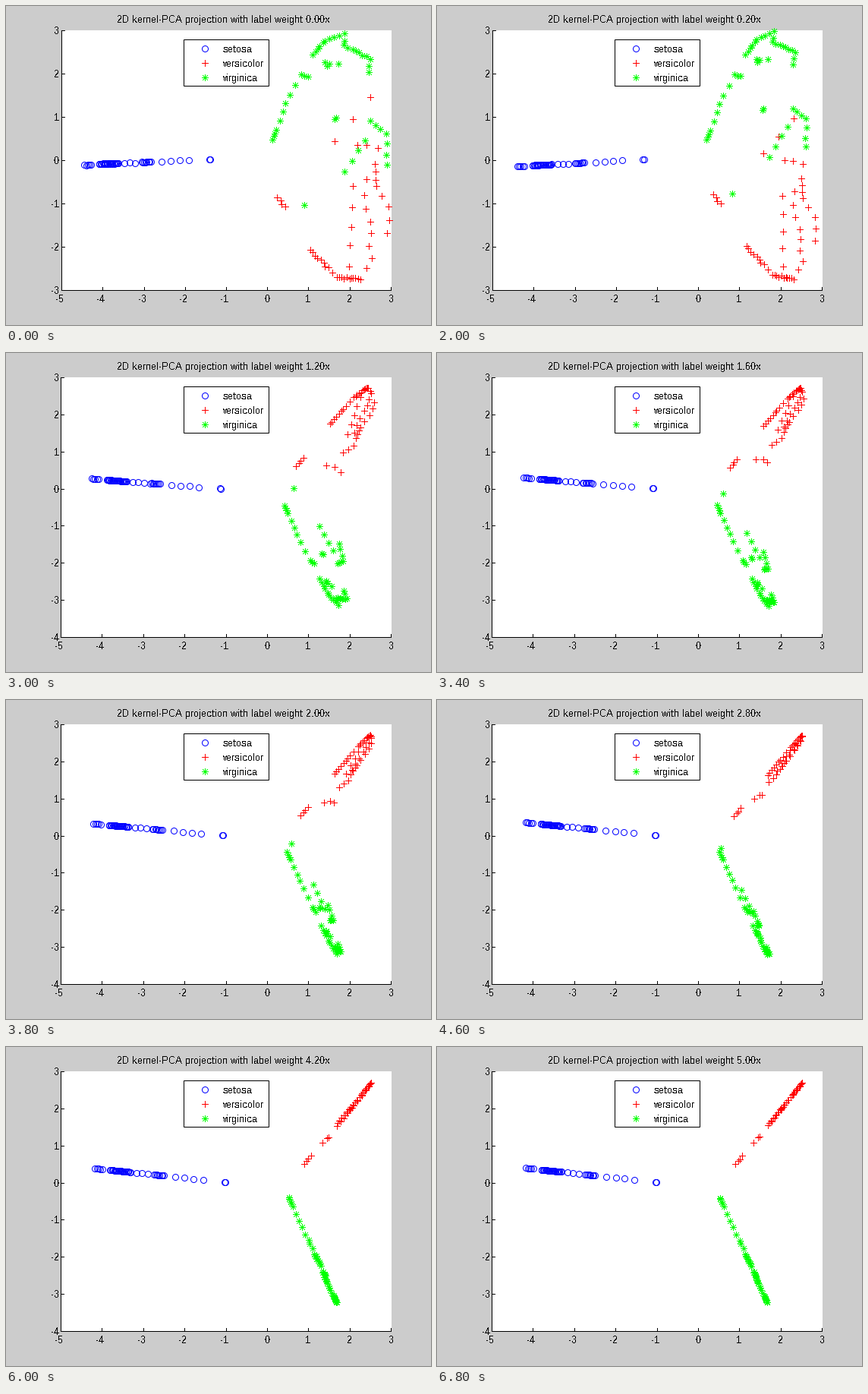
A matplotlib script for the animation above (7000 ms loop, 560 by 420 pixels).

```python
import numpy as np
import matplotlib.pyplot as plt
from matplotlib.animation import FuncAnimation
from matplotlib.markers import MarkerStyle
from matplotlib.patches import Rectangle

W, H = 560, 420
PX = 0.72  # points per pixel at 100 dpi
TOP, BOTTOM, RIGHT = 32, 374, 507
STEP_MS, HOLD, STEPS = 200, 10, 25
FLIP_WEIGHT = 0.55

plt.rcParams.update({
    "font.family": "Liberation Sans", "font.size": 13 * PX,
    "text.hinting": "native", "text.hinting_factor": 1,
    "text.antialiased": False})

rng = np.random.default_rng(4)


def stroke(*keys, jitter=.025):
    """Scatter points along a polyline of (point index, x, y) keys."""
    index, x, y = np.array(keys).T
    steps = np.arange(index[0], index[-1] + 1)
    points = np.column_stack([np.interp(steps, index, x),
                              np.interp(steps, index, y)])
    return points + rng.uniform(-jitter, jitter, points.shape)


# Unweighted shapes: a thin line and two interlocking horseshoe arms
SETOSA = stroke((0, -4.45, -.11), (4, -4.28, -.10), (5, -4.09, -.09),
                (30, -3.62, -.07), (33, -3.2, -.06), (34, -3.06, -.05),
                (41, -2.82, -.04), (42, -2.56, -.03), (45, -1.9, .01),
                (46, -1.41, .02), (47, -1.39, .02), jitter=.008)

VERSICOLOR = np.vstack([
    stroke((0, .24, -.87), (3, .42, -1.06), (4, 1.04, -2.07),
           (11, 1.48, -2.5), (13, 1.68, -2.7), (23, 2.28, -2.76),
           (25, 2.52, -2.28)),
    stroke((0, 1.99, -2.46), (4, 2.06, -.6)),
    stroke((0, 2.5, -2.0), (5, 2.36, -.5), jitter=.08),
    stroke((0, 2.91, -1.7), (2, 2.97, -1.08), (4, 2.62, -.6),
           (7, 2.6, -.08), (8, 2.69, .3), (10, 2.18, .37)),
    stroke((0, 2.5, 1.45), (2, 1.64, .43), jitter=0)])

VIRGINICA = np.vstack([
    stroke((0, .12, .47), (3, .19, .7), (7, .55, 1.5), (9, .84, 1.97),
           (11, .98, 1.93), (12, 1.08, 2.43), (17, 1.4, 2.77),
           (21, 1.88, 2.9), (23, 1.87, 2.65), (30, 2.5, 2.35),
           (32, 2.47, 2.02)),
    stroke((0, 1.36, 2.2), (3, 1.66, 2.16), jitter=.08),
    stroke((0, 2.49, .89), (3, 2.88, .61), (6, 2.92, -.09)),
    stroke((0, 2.36, .46), (3, 1.88, -.28)),
    stroke((0, 1.63, .95), (1, 1.67, .98), jitter=0),
    stroke((0, .89, -1.04), jitter=0)])


def approach(start, end, weight, rate=1.0):
    return end + (start - end) * np.exp(-rate * weight)


def setosa(weight):
    x, y = SETOSA[:, 0], -SETOSA[:, 1]
    x_end = x + .28 + .033 * (x + 4.45)
    y_end = .02 - .122 * (x_end + 1.03)
    return approach(x, x_end, weight), approach(y, y_end, weight, .65)


def versicolor(weight):
    x, y = VERSICOLOR[:, 0], -VERSICOLOR[:, 1]
    x_end = .522 + .579 * x + .288 * y - .38 * np.maximum(x - 2.3, 0)
    x_end = np.minimum(x_end, 2.53)
    y_end = .48 + 1.36 * (x_end - .9)
    return approach(x, x_end, weight), approach(y, y_end, weight)


def virginica(weight):
    x, y = VIRGINICA[:, 0], -VIRGINICA[:, 1]
    depth = .07 + x - .52 * y - .5 * np.maximum(x - 1.4, 0)
    x_end = .55 + (depth - .45) / 2.48
    return approach(x, x_end, weight), approach(y, -depth, weight)


fig = plt.figure(figsize=(W / 100, H / 100), dpi=100, facecolor="#cccccc")
ax = fig.add_axes([0, 0, 1, 1])
ax.set_xlim(0, W)
ax.set_ylim(H, 0)
ax.axis("off")


def line(xs, ys):
    return ax.plot(xs, ys, color="black", lw=PX, zorder=2)[0]


def markers(shapes, color, zorder):
    return [ax.plot([], [], ls="", ms=size * PX, mfc="none", mec=color,
                    marker=MarkerStyle(shape, capstyle="projecting"),
                    mew=PX, antialiased=False, zorder=zorder)[0]
            for shape, size in shapes]


STYLES = [("setosa", [("o", 8)], "#0000ff", setosa),
          ("versicolor", [("+", 8)], "#ff0000", versicolor),
          ("virginica", [("+", 8), ("x", 6)], "#00ff00", virginica)]

panel = ax.add_patch(Rectangle((73, TOP), RIGHT - 72, BOTTOM - TOP,
                               facecolor="white", lw=0, zorder=0))
x_axis = line([73, RIGHT], [BOTTOM] * 2)
y_axis = line([73] * 2, [TOP, BOTTOM])
x_ticks = [(v, line([], []), ax.text(0, 390, str(v), ha="center"))
           for v in range(-5, 4)]
y_ticks = [(v, line([], []), ax.text(70, 0, str(v), ha="right"))
           for v in range(-4, 4)]
title = ax.text(287, 22, "", ha="center")
clouds = [markers(shapes, color, 3 + i)
          for i, (_, shapes, color, _) in enumerate(STYLES)]

ax.add_patch(Rectangle((234, 44), 112, 61, facecolor="white",
                       edgecolor="black", lw=PX, zorder=8))
for i, (name, shapes, color, _) in enumerate(STYLES):
    y = 56 + 19 * i
    for marker in markers(shapes, color, 9):
        marker.set_data([262], [y])
    ax.text(286, y + 5, name, zorder=9)


def update(frame):
    weight = .2 * max(0, frame - HOLD + 1)
    flipped = weight > FLIP_WEIGHT
    low, left = (-4, 72) if flipped else (-3, 73)
    sign = 1 if flipped else -1

    def to_x(v):
        return left + (v + 5) * (RIGHT - left) / 8

    def to_y(v):
        return TOP + (3 - v) * (BOTTOM - TOP) / (3 - low)

    title.set_text(f"2D kernel-PCA projection with label weight {weight:.2f}x")
    panel.set_x(left)
    panel.set_width(RIGHT + 1 - left)
    x_axis.set_xdata([left, RIGHT])
    y_axis.set_xdata([left] * 2)

    for value, tick, label in x_ticks:
        x = round(to_x(value))
        tick.set_data([x] * 2, [BOTTOM - 4, BOTTOM])
        label.set_x(x - 2 if value < 0 else x)
    for value, tick, label in y_ticks:
        y = round(to_y(value))
        tick.set_data([left, left + 4], [y] * 2)
        label.set_y(y + 5)
        tick.set_visible(value >= low)
        label.set_visible(value >= low)

    for cloud, (_, _, _, locate) in zip(clouds, STYLES):
        x, y = locate(weight)
        for layer in cloud:
            layer.set_data(to_x(x), to_y(sign * y))
    return []


anim = FuncAnimation(fig, update, frames=HOLD + STEPS, interval=STEP_MS,
                     repeat=True, repeat_delay=0, blit=False)
plt.show()
```
